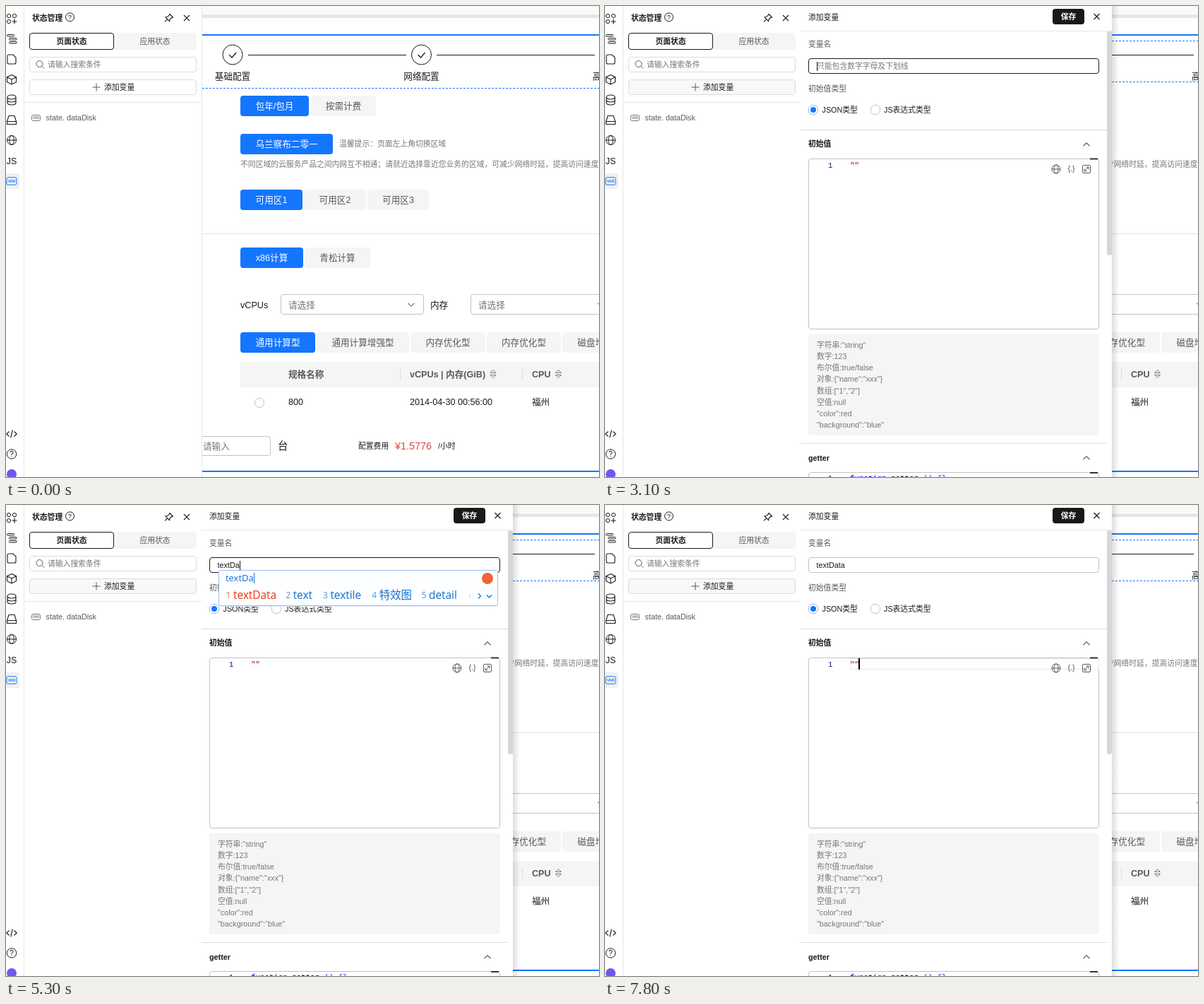
Recreate the animation shown at these times as an HTML page. Size 840 by 667 pixels, loop 8 s.

```html
<!DOCTYPE html>
<html lang="zh-CN">
<head>
<meta charset="utf-8">
<title>状态管理</title>
<style>
html, body { margin: 0; width: 100%; height: 100%; overflow: hidden; background: #fff; }
svg { display: block; width: 840px; height: 667px; }
text { font-family: "Liberation Sans", "Noto Sans CJK SC", "Noto Sans CJK", sans-serif; white-space: pre; }
.mono { font-family: "Liberation Mono", monospace; }
.ime { font-family: "Open Sans", "Noto Sans CJK SC", "Noto Sans CJK", sans-serif; }
</style>
</head>
<body>
<svg id="stage" viewBox="0 0 840 667"></svg>
<script>
const INK = '#191919', BLUE = '#1476ff', GREY = '#777', MID = '#595959';
const PALE = '#f5f5f5', LINE = '#dbdbdb', EDGE = '#c2c2c2';
const SMALL = 10.8, BASE = 12.6, LOOP = 8000;

// cy is the visual middle of the line of text
const label = (s, x, cy, o = {}) => {
  const { size = BASE, fill = INK, anchor = 'start', weight = 400, cls = '', id = '' } = o;
  return `<text id="${id}" class="${cls}" x="${x}" y="${cy + size * .37}" font-size="${size}" ` +
    `fill="${fill}" text-anchor="${anchor}" font-weight="${weight}">${s}</text>`;
};
const small = (s, x, cy, o = {}) => label(s, x, cy, { size: SMALL, ...o });
const rect = (x1, y1, x2, y2, fill, extra = '') =>
  `<rect x="${x1}" y="${y1}" width="${x2 - x1}" height="${y2 - y1}" fill="${fill}" ${extra}/>`;
const frame = (x1, y1, x2, y2, stroke, id = '') =>
  rect(x1 + .5, y1 + .5, x2 - .5, y2 - .5, '#fff', `rx="3.5" stroke="${stroke}" id="${id}"`);
const path = (d, stroke = INK, w = 1, extra = '') =>
  `<path d="${d}" fill="none" stroke="${stroke}" stroke-width="${w}" ${extra}/>`;
const ring = (x, y, r, stroke = INK, fill = 'none') =>
  `<circle cx="${x}" cy="${y}" r="${r}" fill="${fill}" stroke="${stroke}"/>`;
const hline = (x1, x2, y, stroke) => path(`M${x1} ${y + .5}H${x2}`, stroke);
const cross = (x, y) => path(`M${x - 4} ${y - 4}l8 8m0-8l-8 8`, INK, 1.2);
const chevron = (x, y, dy, stroke = MID) => path(`M${x - 4.5} ${y - dy / 2}l4.5 ${dy}l4.5 ${-dy}`, stroke, 1.1);
const globe = (x, y, r, c) => ring(x, y, r, c) +
  path(`M${x - r} ${y}h${2 * r}M${x} ${y - r}a${r * .5} ${r} 0 0 0 0 ${2 * r}a${r * .5} ${r} 0 0 0 0 ${-2 * r}`, c);
const help = (x, y, r, size) => ring(x, y, r) + label('?', x, y, { size, anchor: 'middle' });
const varBox = (x, y, w, h, c) =>
  rect(x - w / 2, y - h / 2, x + w / 2, y + h / 2, 'none', `rx="2" stroke="${c}"`) +
  label('VAR', x, y, { size: w * .37, fill: c, anchor: 'middle', weight: 700 });
const pill = (s, x1, x2, y, on) =>
  rect(x1, y, x2, y + 29, on ? BLUE : PALE, 'rx="4"') +
  label(s, (x1 + x2) / 2, y + 14.7, { anchor: 'middle', fill: on ? '#fff' : MID });
const sorter = (x, y) => path(`M${x - 4} ${y - 1.5}l4-4l4 4zM${x - 4} ${y + 1.5}l4 4l4-4z`, GREY);
const step = (s, x) => ring(x, 69, 14) + path(`M${x - 5} 69l4 4l6-7`, INK, 1.2) +
  label(s, x, 99, { anchor: 'middle' });

function canvasArea() {
  const picker = x => frame(x, 408, x + 203, 437, EDGE) +
    label('请选择', x + 11, 423, { fill: GREY }) + chevron(x + 185, 423, 4.5, GREY);
  return rect(278, 0, 840, 11, '#f9f9f9') + rect(278, 12, 840, 17, '#e6e6e6') +
    rect(278, 40, 840, 42, BLUE) + rect(278, 658, 840, 660, BLUE) +
    step('基础配置', 321) + step('网络配置', 588.5) + label('高级配置', 831, 99) +
    hline(343, 567, 69, INK) + hline(610, 834, 69, INK) +
    path('M278 0H840', BLUE, 1, 'id="dashTop" stroke-dasharray="3 2"') +
    path('M278 0H840', BLUE, 1, 'id="dashLow" stroke-dasharray="3 2"') +
    pill('包年/包月', 332, 429, 127, 1) + pill('按需计费', 432, 524, 127) +
    pill('乌兰察布二零一', 332, 463, 181, 1) +
    small('温馨提示：页面左上角切换区域', 472, 195, { fill: GREY }) +
    small('不同区域的云服务产品之间内网互不相通；请就近选择靠近您业务的区域，可减少网络时延，提高访问速度', 332, 224, { fill: GREY }) +
    pill('可用区1', 332, 420, 260, 1) + pill('可用区2', 422, 510, 260) + pill('可用区3', 512, 599, 260) +
    hline(278, 840, 322, '#e3e3e3') +
    pill('x86计算', 332, 421, 342, 1) + pill('青松计算', 423, 516, 342) +
    label('vCPUs', 332, 423) + picker(389) + label('内存', 601, 423) + picker(658) +
    pill('通用计算型', 332, 438, 462, 1) + pill('通用计算增强型', 440, 571, 462) +
    pill('内存优化型', 573, 679, 462) + pill('内存优化型', 681, 786, 462) + pill('磁盘增强型', 788, 894, 462) +
    rect(332, 504, 840, 540, PALE) +
    path('M558.5 514v15M731.5 514v15', LINE) +
    label('规格名称', 400, 521, { fill: MID, weight: 700 }) +
    label('vCPUs | 内存(GiB)', 572, 521, { fill: MID, weight: 700 }) +
    label('CPU', 745, 521, { fill: MID, weight: 700 }) + sorter(690, 521) + sorter(782.5, 521) +
    ring(359, 562, 6.5, EDGE) + label('800', 400, 560.5) +
    label('2014-04-30 00:56:00', 572, 560.5) + label('福州', 745, 560.5) +
    frame(260, 609, 375, 637, EDGE) + label('请输入', 279, 623, { fill: GREY }) +
    label('台', 385, 623, { size: 14.4 }) + small('配置费用', 499, 623) +
    label('¥1.5776', 551, 622.5, { size: 14.4, fill: '#e54545' }) + small('/小时', 612, 623);
}

function rail() {
  return rect(0, 0, 277, 667, '#fff') + rect(0, 237, 19, 259, '#f0f0f0', 'rx="3"') +
    path('M25.5 0V667M277.5 0V667', '#e6e6e6') +
    ring(4, 14, 2.6) + ring(12, 14, 2.6) + ring(4, 22, 2.6) + path('M12 18.5v7M8.5 22h7', INK, 1.2) +
    [0, 1, 2].map(i => rect(i ? 4.5 : 1.5, 40.5 + i * 5, i ? 15 : 11.5, 43 + i * 5, 'none', `rx="1" stroke="${INK}"`)).join('') +
    path('M4 69h6l4 4v7q0 2-2 2H4q-2 0-2-2V71q0-2 2-2z', INK, 1.1) +
    path('M8 97.5l6.5 3.2v7L8 111l-6.5-3.3v-7zM1.5 100.7L8 104l6.5-3.3M8 104v7', INK, 1.1) +
    path('M2 129v8c0 4 12 4 12 0v-8c0-4-12-4-12 0c0 4 12 4 12 0M2 133c0 4 12 4 12 0', INK, 1.1) +
    path('M4 155.5h8l2.5 8h-13zM1.5 163.5h13v4h-13z', INK, 1.1) +
    globe(8, 190, 6.5, INK) + label('JS', 8, 219, { size: 12.4, anchor: 'middle' }) +
    varBox(8, 248, 14, 10.5, BLUE) +
    path('M4.5 602.5L.8 606l3.7 3.5M11.5 602.5l3.7 3.5l-3.7 3.5M9.3 600.5l-2.6 11', INK, 1.1) +
    help(8, 634.5, 6.7, 10.5) + `<circle cx="8" cy="663" r="7" fill="#6a5af0"/>` +
    small('状态管理', 37, 17, { weight: 700 }) + help(90.5, 15.8, 6, 9.5) +
    path('M232 11.5l4.5 4.5l-2 .6l-2.5 2.5l-.4 2.6l-5.7-5.7l2.7-.4l2.4-2.4zM228.5 18.8l-3.5 3.5', INK, 1.1) +
    cross(256, 17) +
    rect(150, 38, 270, 62, PALE, 'rx="4"') + frame(33, 38, 153, 62, INK) +
    small('页面状态', 93, 50, { anchor: 'middle', weight: 700 }) +
    small('应用状态', 211, 50, { anchor: 'middle', fill: MID }) +
    frame(33, 72, 270, 94, LINE) + ring(47.5, 82, 4.5, MID) + path('M51 85.5l3.2 3.2', MID) +
    small('请输入搜索条件', 59, 83, { fill: GREY }) +
    frame(33, 104, 270, 126, LINE, 'addBox') + path('M128 109.5v11M122.5 115h11', MID) +
    small('添加变量', 139, 115) + hline(26, 277, 136, '#e6e6e6') +
    varBox(42.5, 158.5, 12, 8, GREY) + small('state. dataDisk', 56.5, 158.5, { fill: MID });
}

function drawer() {
  const notes = ['字符串:"string"', '数字:123', '布尔值:true/false', '对象:{"name":"xxx"}',
    '数组:["1","2"]', '空值:null', '"color":red', '"background":"blue"'];
  const code = (s, x, cy, fill, id) => small(s, x, cy, { cls: 'mono', fill, id });
  return rect(277, 0, 718, 667, '#fff') + rect(718, 0, 728, 667, 'url(#shade)') +
    small('添加变量', 288, 16, { weight: 500 }) + rect(634, 4, 679, 26, INK, 'rx="4"') +
    small('保存', 656.5, 15, { anchor: 'middle', fill: '#fff', weight: 700 }) + cross(696.5, 15) +
    hline(277, 718, 35, '#e6e6e6') + rect(711, 36, 718, 353, '#d6d6d6', 'rx="3"') +
    small('变量名', 288, 54, { fill: MID }) + frame(288, 74, 700, 96, EDGE, 'nameBox') +
    small('只能包含数字字母及下划线', 300, 85, { fill: GREY, id: 'tip' }) +
    small('', 299.5, 85, { id: 'typed' }) + rect(0, 79, 1, 92, INK, 'id="caret"') +
    small('初始值类型', 288, 117, { fill: MID }) +
    ring(295, 147, 6.8, '#8fb8f5') + `<circle cx="295" cy="147" r="4" fill="${BLUE}"/>` +
    small('JSON类型', 307.5, 147) + ring(383, 147, 6.8, EDGE) + small('JS表达式类型', 395, 147) +
    hline(277, 711, 175, LINE) + small('初始值', 288, 195, { weight: 700 }) + chevron(682, 196, -4.5) +
    frame(288, 216, 700, 458, EDGE) +
    rect(347.5, 217.5, 699.5, 232.5, 'none', 'id="lineBox" stroke="#e8e8e8"') +
    rect(687, 215.5, 698, 217.5, '#333') +
    code('1', 316, 225, '#0b216f') + code('""', 347, 225, '#a31515', 'quotes') +
    rect(359, 217, 361, 233, '#000', 'id="codeCaret"') +
    globe(639, 231, 6, MID) + small('{.}', 660.5, 230.5, { anchor: 'middle', fill: MID }) +
    rect(676.5, 225.5, 687.5, 236.5, 'none', `rx="1.5" stroke="${MID}"`) +
    path('M679 234l6-6m-3.5 0h3.5v3.5M679 230.5v3.5h3.5', MID) +
    rect(288, 465, 700, 608, PALE, 'rx="4"') +
    notes.map((s, i) => small(s, 300, 480 + i * 16.15, { fill: GREY })).join('') +
    hline(277, 711, 619, LINE) + small('getter', 288, 640, { weight: 700 }) + chevron(682, 640, -4.5) +
    frame(288, 660, 700, 700, EDGE) + rect(687, 660, 698, 662, '#333') + code('1', 316, 668.5, '#0b216f') +
    code('function', 347, 668.5, '#00f', 'keyword') + code('getter', 405, 668.5, '#000') +
    code('() {}', 451, 668.5, '#0431fa') + '<g id="ime"></g>';
}

// Input method window: start time, composed letters, candidates, time of the hint
const KEYS = [
  [3700, 't', '他 她 天 听 太'],
  [3800, 'te', '特 忑 忒 铽 慝'],
  [4100, 'tex', '特效 text 特性 特新 特写'],
  [4300, 'text', 'textData text textile 特效图 特性', 4600],
  [4800, 'textD', 'textData text 特效图 特性 特效'],
  [5300, 'textDa', 'textData text textile 特效图 detail'],
  [5500, 'textDat', 'textData text textile 特大图片 detail'],
  [5600, 'textData', 'textData text 特效图 特性 特效', 5900],
  [6200, 'textData', '']
];
const ADVANCE = { t: 6, e: 8.7, x: 8.3, D: 11, d: 9, a: 7.5, i: 4, l: 4 };
const widthOf = word => [...word].reduce((sum, c) => sum + (ADVANCE[c] || 15.5), 0);

function imeWindow(letters, words, hint) {
  const ime = { cls: 'ime' }, blue = '#1270d2', indent = 10.5, gap = 13.2;
  let x = 311.5, items = '';
  words.split(' ').forEach((word, i) => {
    const fill = i ? blue : '#f5300f';
    items += label(i + 1, x, 128, { ...ime, size: 12, fill: i ? '#4a94e4' : '#f2613f' }) +
      label(word, x + indent, 127.5, { ...ime, size: 15.4, fill });
    x += indent + widthOf(word) + gap;
  });
  const end = Math.round(x - gap), right = end + 59;
  return rect(301.5, 92.5, right - .5, 142.5, '#fdfeff', 'rx="2" stroke="#9cc0ee"') +
    hline(303, right - 2, 143, '#e2e8f0') +
    label(letters, 311, 103.5, { ...ime, size: 13, fill: blue, id: 'composed' }) +
    rect(0, 96, 1, 111, letters === 'textData' ? '#f5300f' : blue, 'id="imeCaret"') +
    (hint ? small('9 打开智能写作助手', right - 29.5, 104, { anchor: 'end', fill: '#333' }) : '') +
    `<circle cx="${right - 15}" cy="104" r="8" fill="#f2623a"/>` + items +
    path(`M${end + 21} 126l-3 3l3 3`, '#c5d5e8') +
    path(`M${end + 31} 125.5l3.5 3.5l-3.5 3.5M${end + 43} 127.5l3.5 3.5l3.5-3.5`, blue, 1.3);
}

const stage = document.getElementById('stage');
stage.innerHTML = `<defs><linearGradient id="shade"><stop stop-opacity=".13"/><stop offset="1" stop-opacity="0"/></linearGradient></defs>` +
  canvasArea() + rail() + `<g id="drawer">${drawer()}</g>`;
const el = id => document.getElementById(id);
const set = (id, attrs) => { for (const k in attrs) el(id).setAttribute(k, attrs[k]); };
const show = (id, on) => set(id, { visibility: on ? 'inherit' : 'hidden' });
const within = (t, ...spans) => spans.some(([a, b]) => t >= a && t < b);

let shownIme = null;
function render(t) {
  const slide = Math.min(5, Math.max(0, Math.floor(t / 100) - 1));
  const drop = 9 * (1 - slide / 5);
  show('dashTop', slide > 0);
  set('dashTop', { transform: `translate(0 ${49.5 + drop})` });
  set('dashLow', { transform: `translate(0 ${107.5 + drop})` });

  set('addBox', { stroke: within(t, [900, 1400]) ? '#b5b5b5' : LINE, fill: t >= 1400 ? '#f8f8f8' : '#fff' });
  set('drawer', { visibility: t >= 1200 ? 'visible' : 'hidden' });
  set('quotes', { fill: t < 1300 ? '#000' : '#a31515' });
  set('keyword', { fill: t < 1300 ? '#000' : '#00f' });

  const focus = within(t, [1900, 7600]);
  set('nameBox', { stroke: focus ? INK : within(t, [1800, 1900]) ? GREY : EDGE });
  show('lineBox', t >= 7700);
  show('codeCaret', t >= 7700);

  const key = KEYS.filter(k => t >= k[0]).pop();
  const letters = key ? key[1] : '';
  show('tip', !key);
  if (el('typed').textContent !== letters) el('typed').textContent = letters;
  const caretX = letters ? 299.5 + el('typed').getComputedTextLength() : 300;
  set('caret', { x: Math.round(caretX) });
  show('caret', within(t, [2100, 2600], [3100, 3500], [3700, 5900], [6200, 6700], [7200, 7600]));

  const open = key && key[2];
  const hint = open && t >= key[3];
  const state = open ? letters + hint : '';
  if (state !== shownIme) {
    shownIme = state;
    el('ime').innerHTML = open ? imeWindow(letters, key[2], hint) : '';
    if (open) set('imeCaret', { x: Math.round(311 + el('composed').getComputedTextLength()) });
  }
}

const start = performance.now();
function tick() {
  render((performance.now() - start) % LOOP);
  requestAnimationFrame(tick);
}
tick();
</script>
</body>
</html>
```
